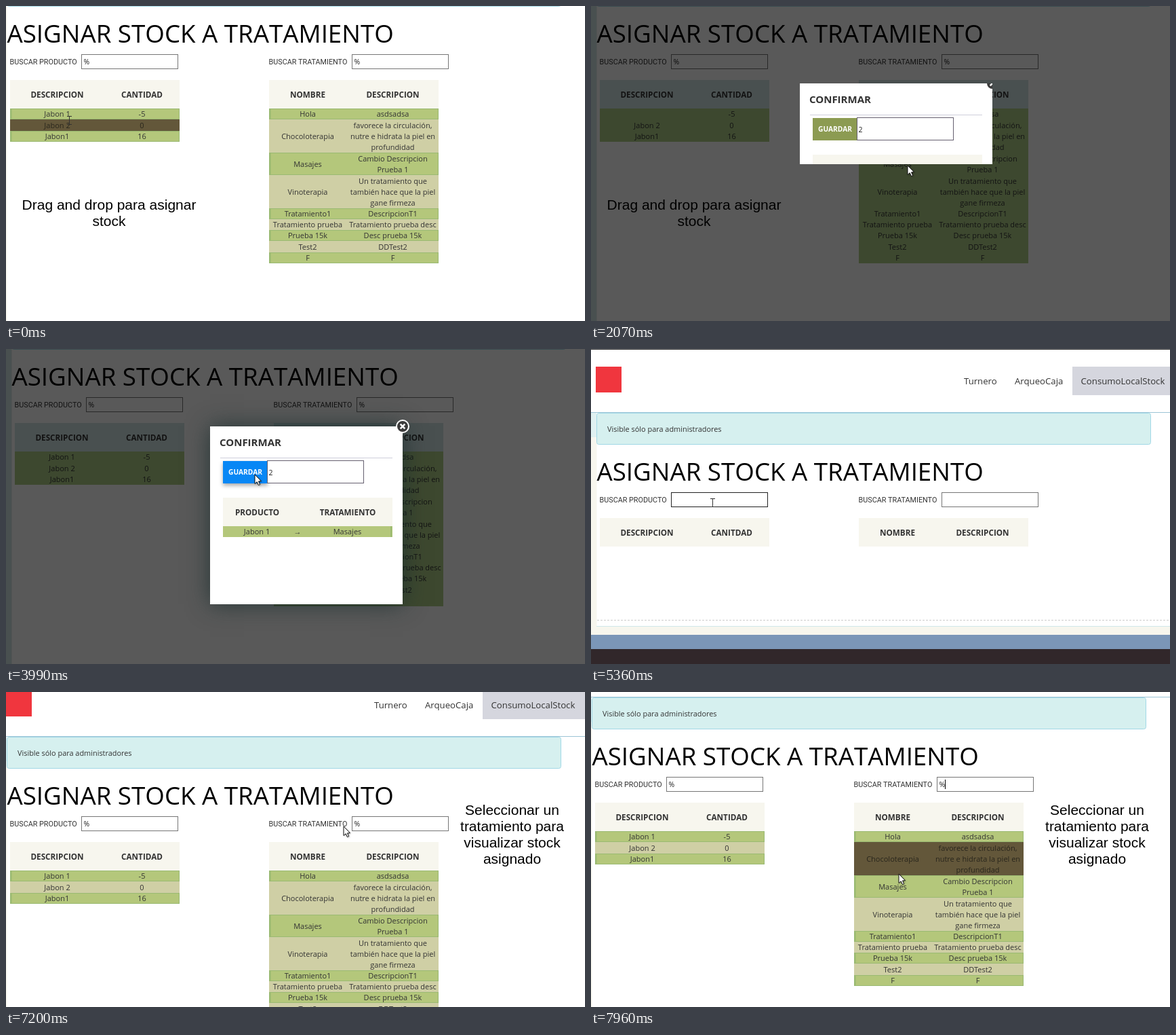
These frames come from a looping animation (854x464 px, 7.99 s). An HTML page with a canvas:

```html
<!DOCTYPE html>
<html lang="es">
<head>
<meta charset="utf-8">
<title>Asignar stock a tratamiento</title>
<style>
  html, body { margin: 0; width: 100%; height: 100%; overflow: hidden; background: #fff; }
  canvas { display: block; }
</style>
</head>
<body>
<canvas id="stage" width="854" height="464"></canvas>
<script>
const ctx = document.getElementById('stage').getContext('2d');
const W = 854, H = 464, LOOP = 7990, LINE = 16.29, ROWS_TOP = 291;

const OPEN = 1890, CLOSE = 4050, RELOAD = 4200, LIST_PRODUCTS = 5850, LIST_TREATMENTS = 6650;

const sans = (size, weight = 400) => `${weight} ${size}px "Open Sans", sans-serif`;
const BODY = sans(11), HEAD = sans(11.7, 700), FIELD = sans(10.5);
const LABEL = '10.8px Roboto, sans-serif';
const CAPTION = '21px "Liberation Sans", Arial, sans-serif';

const CREAM = '#f7f6ee', GREEN = '#b4c77b', KHAKI = '#cfcfa5', HOVER = '#63573a', EDGE = '#9aba72';
const DIM_CREAM = '#d3e6e6', DIM_GREEN = '#b0d088';

const products = [['Jabon 1', '-5'], ['Jabon 2', '0'], ['Jabon1', '16']];
const treatments = [
  ['Hola', 'asdsadsa'],
  ['Chocoloterapia', 'favorece la circulación,\nnutre e hidrata la piel en\nprofundidad'],
  ['Masajes', 'Cambio Descripcion\nPrueba 1'],
  ['Vinoterapia', 'Un tratamiento que\ntambién hace que la piel\ngane firmeza'],
  ['Tratamiento1', 'DescripcionT1'],
  ['Tratamiento prueba', 'Tratamiento prueba desc'],
  ['Prueba 15k', 'Desc prueba 15k'],
  ['Test2', 'DDTest2'],
  ['F', 'F']
];

// [time, x, y] of the pointer
const pointerPath = [
  [0, 93, 168], [500, 91, 163], [815, 91, 163], [920, 180, 148], [1100, 404, 217],
  [1300, 468, 235], [1610, 485, 237], [1890, 485, 237], [2070, 467, 235], [2730, 467, 235],
  [3000, 430, 182], [3200, 430, 182], [3450, 367, 185], [4050, 367, 185], [4240, 200, -30],
  [4700, 190, -30], [5300, 179, 226], [6000, 179, 226], [6350, 545, 224], [6600, 545, 224],
  [7150, 498, 198], [7400, 498, 198], [7900, 454, 268], [LOOP, 454, 268]
];

const between = (t, a, b) => t >= a && t < b;
const progress = (t, a, b) => Math.min(1, Math.max(0, (t - a) / (b - a)));
const smooth = p => p * p * (3 - 2 * p);

function pointerAt(t) {
  const i = pointerPath.findIndex(k => k[0] > t);
  const [t0, x0, y0] = pointerPath[i - 1], [t1, x1, y1] = pointerPath[i];
  const p = smooth(progress(t, t0, t1));
  return { x: x0 + (x1 - x0) * p, y: y0 + (y1 - y0) * p };
}

function rect(x, y, w, h, color) {
  ctx.fillStyle = color;
  ctx.fillRect(x, y, w, h);
}

function outline(x, y, w, h, color) {
  ctx.strokeStyle = color;
  ctx.lineWidth = 1;
  ctx.strokeRect(x, y, w, h);
}

function text(str, x, y, font, color = '#333', align = 'left') {
  ctx.font = font;
  ctx.fillStyle = color;
  ctx.textAlign = align;
  ctx.fillText(str, x, y);
}

function caption(lines, x, y) {
  lines.forEach((line, i) => text(line, x, y + i * 24, CAPTION, '#000', 'center'));
}

function field(x, value, focused, caret) {
  rect(x, 212, 142, 20, '#fff');
  outline(x - .5, 211.5, 142, 21, focused ? '#222' : '#767676');
  text(value, x + 2.5, 226, FIELD, '#222');
  if (caret) rect(x + 11, 215, 1, 14, '#000');
}

// Lists the rows with their document positions and heights, on whole pixels.
function layout(rows) {
  let end = ROWS_TOP;
  return rows.map(cells => {
    const y = Math.round(end);
    end += LINE * cells[1].split('\n').length;
    return { cells, y, h: Math.round(end) - y };
  });
}

function table(x, centers, heads, rows, view) {
  const { pointer, scroll, dimmed, dragging } = view;
  rect(x, 249, 250, 42, dimmed ? DIM_CREAM : CREAM);
  heads.forEach((head, i) => text(head, centers[i], 275, HEAD, '#333', 'center'));
  layout(rows).forEach(({ cells, y, h }, i) => {
    const left = x + view.shift, py = pointer.y + scroll;
    const over = dragging ? rows === products && i === 0
      : pointer.x >= left && pointer.x < left + 250 && py >= y && py < y + h;
    const hovered = over && !dimmed;
    const odd = i % 2 === 0;
    rect(x, y, 250, h, dimmed ? DIM_GREEN : hovered ? HOVER : odd ? GREEN : KHAKI);
    if (odd && !hovered && !dimmed) {
      outline(x + .5, y + .5, 249, h - 1, EDGE);
      rect(x, y, 2.5, h, EDGE);
    }
    cells.forEach((cell, c) => {
      if (c === 0 && i === 0 && rows === products && view.lifted) return;
      const lines = cell.split('\n');
      lines.forEach((line, n) => {
        const base = y + h / 2 + (n - (lines.length - 1) / 2) * LINE + 4.4;
        text(line, centers[c], Math.round(base), BODY, hovered ? '#29261c' : '#333', 'center');
      });
    });
  });
}

function page(t, view) {
  const fresh = t >= RELOAD;
  const hasProducts = !fresh || t >= LIST_PRODUCTS;
  const hasTreatments = !fresh || t >= LIST_TREATMENTS;
  const grow = Math.round(LINE * (hasTreatments ? 14 : hasProducts ? 3 : 0));
  const caret = t > 5720 && Math.floor(t / 500) % 2 === 1;

  ctx.save();
  ctx.translate(view.shift, -view.scroll);

  rect(0, 26, 38, 38, '#f0363e');
  rect(703, 26, 160, 42, '#d5d6de');
  text('Turnero', 543, 52, sans(13.2));
  text('ArqueoCaja', 618, 52, sans(13.2));
  text('ConsumoLocalStock', 715.5, 52, sans(13.2));

  rect(-8, 94, 9, 36, '#e0f1f1');
  rect(-8, 130, 9.5, 291 + grow, view.dimmed ? DIM_CREAM : CREAM);
  rect(-8, 93, W + 16, 1, '#9cc4d6');
  rect(1, 408 + grow, W, 1, '#cfe8ea');
  rect(-8, 409 + grow, W + 16, 12, CREAM);
  rect(-8, 421 + grow, W + 16, 21, '#7b96b8');
  rect(-8, 442 + grow, W + 16, 200, '#31272a');
  ctx.setLineDash([3, 2]);
  ctx.strokeStyle = '#ccc';
  ctx.beginPath();
  ctx.moveTo(2, 399.5 + grow);
  ctx.lineTo(W, 399.5 + grow);
  ctx.stroke();
  ctx.setLineDash([]);

  ctx.beginPath();
  ctx.roundRect(1.5, 94.5, 817, 46, 3);
  ctx.fillStyle = '#d6f0ef';
  ctx.fill();
  ctx.strokeStyle = '#a2d8e6';
  ctx.stroke();
  text('Visible sólo para administradores', 17, 121.5, sans(10.9));

  ctx.fontKerning = 'none';
  text('ASIGNAR STOCK A TRATAMIENTO', 1.5, 194, sans(36.7), '#000');
  ctx.fontKerning = 'auto';
  text('BUSCAR PRODUCTO', 5.5, 226, LABEL);
  text('BUSCAR TRATAMIENTO', 387.5, 226, LABEL);
  field(112, !fresh || t >= 5750 ? '%' : '', between(t, 5250, 6350), caret && between(t, 5750, 6350));
  field(511, !fresh || t >= 6450 ? '%' : '', false, caret && t >= 6450);

  table(6, [75.5, 200.5], ['DESCRIPCION', hasProducts ? 'CANTIDAD' : 'CANITDAD'],
    hasProducts ? products : [], view);
  table(388, [445, 570.5], ['NOMBRE', 'DESCRIPCION'], hasTreatments ? treatments : [], view);
  ctx.restore();

  if (between(t, RELOAD, 6600)) rect(0, 0, W, 1, '#333');
}

function closeButton(x, y) {
  ctx.beginPath();
  ctx.arc(x, y, 9, 0, 7);
  ctx.fillStyle = '#3c3c3c';
  ctx.fill();
  ctx.strokeStyle = '#fff';
  ctx.lineWidth = 2;
  ctx.stroke();
  ctx.lineWidth = 2.6;
  ctx.beginPath();
  for (const d of [-3.3, 3.3]) {
    ctx.moveTo(x - 3.3, y - d);
    ctx.lineTo(x + 3.3, y + d);
  }
  ctx.stroke();
}

function modal(t) {
  const grown = .5 - Math.cos(progress(t, 1925, 2235) * Math.PI) / 2;
  const open = grown === 1;
  const height = Math.round(262 * grown);
  ctx.save();
  if (!open) ctx.translate(7, 0);
  if (open) {
    ctx.shadowColor = 'rgba(25,45,45,.8)';
    ctx.shadowBlur = 32;
  }
  rect(301, 114, 284, height, '#fff');
  ctx.shadowColor = 'transparent';

  ctx.save();
  ctx.beginPath();
  ctx.rect(301, 114, 284, height);
  ctx.clip();
  text('CONFIRMAR', 315, 143, sans(15, 700));
  rect(316, 160, 254, 1, '#cfcfdb');

  const over = progress(t, 3360, 3480);
  if (over) {
    ctx.shadowColor = 'rgba(0,0,0,.35)';
    ctx.shadowBlur = 6;
    ctx.shadowOffsetY = 3;
  }
  rect(320, 165, 66, 33, `rgb(${140 - 132 * over},${155 - 20 * over},${82 + 163 * over})`);
  ctx.shadowColor = 'transparent';
  text('GUARDAR', 353, 185, sans(10.2, 700), '#fff', 'center');
  rect(386, 165, 142, 33, '#fff');
  outline(385.5, 164.5, 142, 33, between(t, 3000, 3400) ? '#222' : '#666070');
  text('2', 387.5, 185.5, FIELD, '#222');

  rect(320, 219, 250, 42, CREAM);
  text('PRODUCTO', 370.5, 244.5, HEAD, '#333', 'center');
  text('TRATAMIENTO', 504, 244.5, HEAD, '#333', 'center');
  rect(320, 261, 250, 16, GREEN);
  rect(567, 261, 2, 16, EDGE);
  ['Jabon 1', '→', 'Masajes'].forEach((cell, i) =>
    text(cell, [370, 430, 503.5][i], 273, BODY, '#333', 'center'));
  if (!open) closeButton(585, 114);
  ctx.restore();

  if (open) closeButton(585, 114);
  ctx.restore();
}

function ghost({ x, y }) {
  rect(x - 85, y - 20, 140, 17, 'rgba(58,104,66,.5)');
  text('Jabon 1', x - 15, y - 7, BODY, 'rgba(60,75,65,.45)', 'center');
}

function arrow({ x, y }) {
  ctx.save();
  ctx.translate(x, y);
  ctx.beginPath();
  [[0, 0], [0, 13.5], [3.2, 10.7], [5.4, 15.6], [7.6, 14.6], [5.5, 9.9], [9.5, 9.7]]
    .forEach(p => ctx.lineTo(...p));
  ctx.closePath();
  ctx.shadowColor = 'rgba(0,0,0,.4)';
  ctx.shadowBlur = 3;
  ctx.shadowOffsetX = ctx.shadowOffsetY = 1;
  ctx.fillStyle = '#fff';
  ctx.fill();
  ctx.shadowColor = 'transparent';
  ctx.strokeStyle = '#111';
  ctx.lineWidth = 1;
  ctx.stroke();
  ctx.restore();
}

function beam({ x, y }) {
  const cx = Math.round(x), cy = Math.round(y);
  rect(cx, cy - 6, 1, 12, '#333');
  for (const end of [cy - 6, cy + 6]) {
    rect(cx - 3, end, 3, 1, '#333');
    rect(cx + 1, end, 3, 1, '#333');
  }
}

function draw(t) {
  const pointer = pointerAt(t);
  const dragging = between(t, 815, 1670);
  const dimmed = between(t, OPEN, 4150);
  const view = {
    pointer, dragging, dimmed,
    lifted: between(t, 815, 2230),
    shift: between(t, OPEN, LIST_TREATMENTS) ? 7 : 0,
    scroll: t < RELOAD ? 140 : Math.round(86 * smooth(progress(t, 7056, 7436)))
  };

  rect(0, 0, W, H, '#fff');
  page(t, view);
  if (dimmed) {
    const shade = .65 * progress(t, OPEN, 2010) * (1 - progress(t, CLOSE, 4150));
    rect(0, 0, W, H, `rgba(0,0,0,${shade})`);
  }
  if (between(t, OPEN, CLOSE)) modal(t);
  if (t < 3000) caption(['Drag and drop para asignar', 'stock'], 152, 300);
  if (t >= 6600) {
    caption(['Seleccionar un', 'tratamiento para', 'visualizar stock', 'asignado'], 746.5, 181);
  }
  if (dragging) ghost(pointer);
  const typing = t < 1670 || between(t, 2950, 3270) || between(t, 5250, 6080) || between(t, 6300, 6800);
  (typing ? beam : arrow)(pointer);
}

const start = performance.now();
function tick() {
  draw((performance.now() - start) % LOOP);
  requestAnimationFrame(tick);
}
tick();
</script>
</body>
</html>
```
